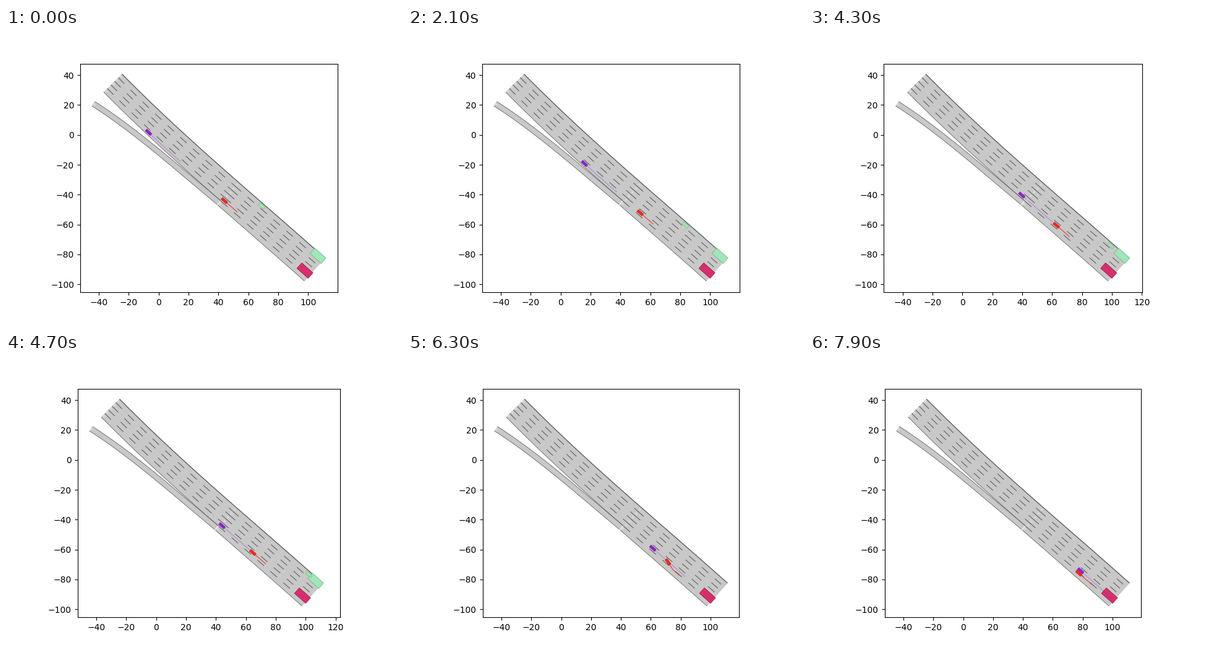
A matplotlib script that plays this animation: 640 by 480 pixels, repeating every 8 s.

```python
import numpy as np
import matplotlib.pyplot as plt
from matplotlib.animation import FuncAnimation
from matplotlib.patches import Polygon

FRAMES, STEP = 80, 0.1
LANE = 3.44          # lane width in metres
SPLIT = 53.1         # where the on-ramp becomes the sixth lane
START, END = -24.55, 111.3
GREEN_EXIT = 4.85
ROAD, BOUND, LIGHT = "#c7c7c7", "#555555", "#dddddd"
PURPLE, RED, GREEN, CRIMSON = "#8f1fdc", "#f0281e", "#9fe6b8", "#d72f6d"

TOP_FIT = np.polyfit([-24.55, -0.75, 22.02, 52.66, 79.98, 111.3],
                     [40.65, 17.47, -3.85, -31.17, -54.77, -82.5], 3)
RAMP_FIT = np.polyfit([-43.68, -29.72, -16.48, 1.32, 22.85, 40.24],
                      [20.78, 11.47, 1.53, -12.75, -30.55, -45.25], 3)


def offset_curve(fit, u, d):
    """Points at distance d to the right of a fitted curve."""
    u = np.asarray(u, float)
    slope = np.polyval(np.polyder(fit), u)
    norm = np.hypot(1, slope)
    return np.column_stack([u + d * slope / norm,
                            np.polyval(fit, u) - d / norm])


def box(center, angle, length, width):
    c, s = np.cos(angle), np.sin(angle)
    corners = np.array([[1, 1], [-1, 1], [-1, -1], [1, -1]]) * [length / 2, width / 2]
    return corners @ np.array([[c, s], [-s, c]]) + center


def smooth(v):
    v = np.clip(v, 0, 1)
    return v * v * (3 - 2 * v)


fig = plt.figure(figsize=(6.4, 4.8), dpi=100)
ax = fig.add_subplot()
ax.set_aspect("equal")


def line(pts, color=BOUND, lw=0.5, **kw):
    return ax.plot(pts[:, 0], pts[:, 1], color=color, lw=lw,
                   solid_capstyle="butt", **kw)[0]


def arrow(center, angle):
    tri = np.array([[1.2, 0], [-0.8, 0.8], [-0.8, -0.8]])
    c, s = np.cos(angle), np.sin(angle)
    ax.add_patch(Polygon(tri @ np.array([[c, s], [-s, c]]) + center,
                         fc=LIGHT, ec="none", zorder=2.5))


def draw_lane(fit, u, left, right):
    """Surface, centre line and direction arrow of one lane."""
    a, b = offset_curve(fit, u, left), offset_curve(fit, u, right)
    ax.add_patch(Polygon(np.vstack([a, b[::-1]]), fc=ROAD, ec=ROAD, lw=0.2, zorder=1))
    mid = (a + b) / 2
    line(mid, "#d0d0d0", zorder=1.5)
    d = mid[1] - mid[0]
    arrow(mid[0] + d / np.hypot(*d), np.arctan2(d[1], d[0]))


def draw_section(u, lanes):
    for i in range(lanes):
        draw_lane(TOP_FIT, u, i * LANE, (i + 1) * LANE)
    for i in range(1, lanes):
        line(offset_curve(TOP_FIT, u, i * LANE), lw=0.7,
             ls=(0, (10 / 0.7, 10 / 0.7)), dash_capstyle="butt", zorder=2)
    line(offset_curve(TOP_FIT, u, 0), lw=0.9, zorder=2)
    line(offset_curve(TOP_FIT, u, lanes * LANE), zorder=2)


ramp_u = np.linspace(-43.68, 40.24, 60)
draw_lane(RAMP_FIT, ramp_u, -1.8, 1.8)
for side in (-1.8, 1.8):
    line(offset_curve(RAMP_FIT, ramp_u, side), zorder=2)
draw_section(np.linspace(START, SPLIT, 60), 5)
draw_section(np.linspace(SPLIT, END, 60), 6)


def goal(center, face, edge):
    return ax.add_patch(Polygon(box(center, np.radians(-41.7), 10, 4.9),
                                fc=face, ec=edge, lw=0.6, zorder=3))


goal((97.9, -90.8), CRIMSON, "#9c1c4c")
green_goal = goal((106.6, -80.9), GREEN, "#7fae8c")


class Car:
    """A vehicle in a lane, with the path it plans to follow."""

    def __init__(self, color, edge, lane, x, horizon, ls, lw, shift=None):
        self.x, self.horizon, self.shift = x, horizon, shift
        self.offset = (lane - 0.5) * LANE
        self.u = np.linspace(-30, 150, 400)
        self.lane_x = offset_curve(TOP_FIT, self.u, self.offset)[:, 0]
        self.path = line(np.zeros((1, 2)), color, lw, ls=ls, zorder=4)
        self.body = ax.add_patch(Polygon(np.zeros((4, 2)), fc=color, ec=edge,
                                         lw=0.4, zorder=5))

    def at(self, t):
        u = np.interp(self.x(t), self.lane_x, self.u)
        d = self.shift(t) if self.shift else 0
        return offset_curve(TOP_FIT, u, self.offset + d)

    def update(self, t):
        look = self.horizon if t > 5.85 or not self.shift else min(self.horizon, 6.1 - t)
        pts = self.at(t + np.linspace(0, look, 30))
        if look < self.horizon:
            # before the lane change is planned, the path stays in lane
            u = np.interp(self.x(t + np.linspace(0, self.horizon, 30)),
                          self.lane_x, self.u)
            pts = offset_curve(TOP_FIT, u, self.offset)
        d = pts[1] - pts[0]
        self.path.set_data(pts.T)
        self.body.set_xy(box(pts[0], np.arctan2(d[1], d[0]), 4.6, 1.8))
        return pts[-1, 0]

    def show(self, on):
        self.path.set_visible(on)
        self.body.set_visible(on)


green = Car(GREEN, "#74ac6c", 1, lambda t: 68.9 + 6.87 * t + 0.04 * t ** 2,
            1.8, ":", 0.7)
purple = Car(PURPLE, "#8a2088", 5, lambda t: -6.75 + 10.8 * t, 2.0, ":", 0.8)
red = Car(RED, "#c8281e", 5, lambda t: 43.97 + 4.39 * t, 2.0, "-", 0.7,
          lambda t: 2.0 * smooth((t - 6.0) / 1.5))

ax.set_ylim(-98.4 - 6.955, 40.7 + 6.955)


def update(i):
    t = i * STEP
    purple.update(t)
    red.update(t)
    present = t < GREEN_EXIT
    green.show(present)
    green_goal.set_visible(present)
    left = -44.7
    right = max(112.0, green.update(t)) if present else END
    pad = 0.05 * (right - left)
    ax.set_xlim(left - pad, right + pad)
    return []


anim = FuncAnimation(fig, update, frames=FRAMES, interval=100,
                     repeat=True, repeat_delay=0, blit=False)
plt.show()
```
